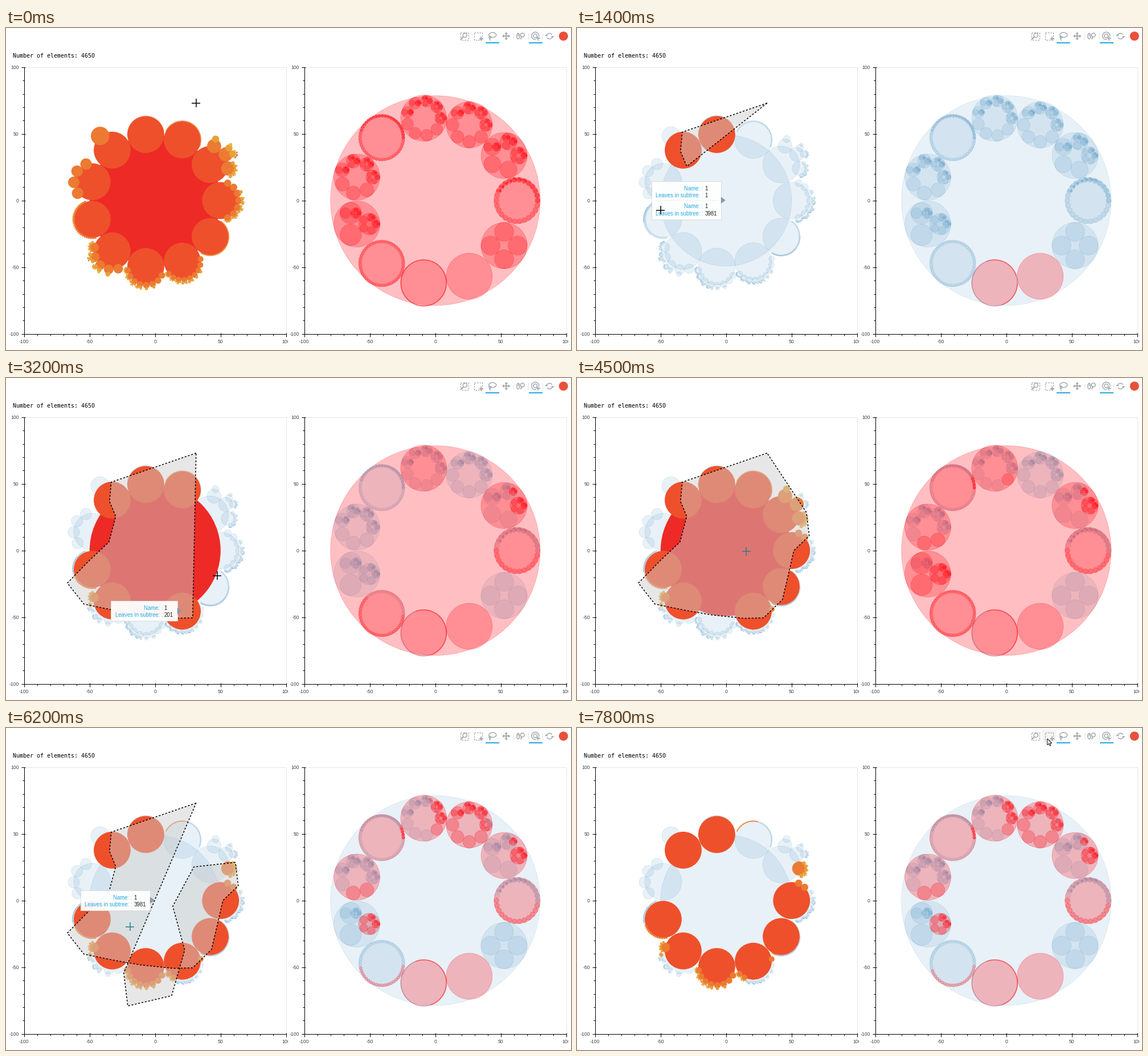
Recreate the animation shown at these times as a matplotlib script. Size 992 by 565 pixels, loop 8000 ms.

```python
import math

import matplotlib.pyplot as plt
import numpy as np
from matplotlib.animation import FuncAnimation
from matplotlib.collections import PathCollection
from matplotlib.patches import Arc, Circle, Ellipse, Polygon, Rectangle
from matplotlib.path import Path

WIDTH, HEIGHT, STEP, FRAMES = 992, 565, 100, 80
PX = 0.72  # points per pixel at 100 dpi
STRETCH = 2.34 / 2.3  # vertical against horizontal axis scale
SANS, MONO = "Liberation Sans", "DejaVu Sans Mono"
GREY, SKY, BLUE, RED = "#a1a6a9", "#26aae1", "#1f77b4", "#ff000c"
LEVELS = ["#ed2a26", "#ee502b", "#ec7a32", "#e8a037", "#e5b93f", "#dd2a24"]

fig = plt.figure(figsize=(WIDTH / 100, HEIGHT / 100), dpi=100, facecolor="white")
ax = fig.add_axes([0, 0, 1, 1])
ax.set_xlim(0.25, WIDTH + 0.25)
ax.set_ylim(HEIGHT + 0.25, 0.25)
ax.axis("off")


def line(xs, ys, color=GREY, width=1.3, **kw):
    return ax.plot(xs, ys, color=color, lw=width * PX, solid_capstyle="butt", **kw)[0]


def label(x, y, text, size, color="#444444", font=SANS, **kw):
    kw = {"ha": "left", "va": "center_baseline", **kw}
    return ax.text(x, y, text, fontsize=size * PX, color=color, family=font, **kw)


def shape(patch):
    return ax.add_patch(patch)


# ---- tree of circles -------------------------------------------------------

FAMILIES = [26, 5, 8, 9, 45, 7, 3, 45, 200, 1, 4]  # children of each branch
LEAFY = 7  # branches from here on have no grandchildren


def child_count(path, siblings, packed_r):
    """Earlier siblings have more children; small circles have none."""
    depth = len(path)
    if depth == 0:
        return len(FAMILIES)
    if depth == 1:
        return FAMILIES[path[0]]
    if path[0] >= LEAFY or packed_r < 2:
        return 0
    seniority = 1 - path[-1] / siblings
    return max(0, math.ceil((7 - depth) * seniority ** 2 - 0.5))


def polar(center, radius, angle):
    return (center[0] + radius * math.cos(angle),
            center[1] - radius * math.sin(angle) * STRETCH)


nodes = []  # (depth, outer centre, outer radius, packed centre, packed radius)


def grow(path, siblings, outer, outer_r, heading, packed, packed_r):
    nodes.append((len(path), outer, outer_r, packed, packed_r))
    n = child_count(path, siblings, packed_r)
    for i in range(n):
        s = math.sin(math.pi / n)
        if path:
            angle = heading - math.pi / 2 + math.pi * (i + 1) / (n + 1)
            small = outer_r * min(0.5, math.sin(math.pi / 2 / (n + 1)))
        else:
            angle, small = 2 * math.pi * (i - 5) / n, outer_r * s
        inner = packed_r * s / (1 + s)
        grow(path + (i,), n, polar(outer, outer_r, angle), small, angle,
             polar(packed, packed_r - inner, 2 * math.pi * i / n), inner)


grow((), 1, (262, 303), 115, 0, (754, 303), 184)
nodes.sort(key=lambda node: node[0])
centers = np.array([node[1] for node in nodes])
outer_paths = [Path.circle(node[1], node[2]) for node in nodes]
packed_paths = [Path.circle(node[3], node[4]) for node in nodes]
level_colors = np.array([LEVELS[min(node[0], 5)] for node in nodes])


def circles(zorder, face, face_alpha, edge_alpha, width=0.8):
    group = PathCollection([], linewidths=width * PX, zorder=zorder,
                           facecolors=[(face, face_alpha)], edgecolors=[(face, edge_alpha)])
    group.set_transform(ax.transData)
    ax.add_collection(group, autolim=False)
    return group


outer_muted = circles(2, BLUE, 0.1, 0.14)
outer_chosen = circles(3, RED, 1, 0, 0)
packed_muted = circles(2, BLUE, 0.1, 0.14)
packed_chosen = circles(3, RED, 0.25, 0.27)


def show_selection(mask):
    on, off = np.flatnonzero(mask), np.flatnonzero(~mask)
    outer_muted.set_paths([outer_paths[i] for i in off])
    packed_muted.set_paths([packed_paths[i] for i in off])
    outer_chosen.set_paths([outer_paths[i] for i in on])
    outer_chosen.set_facecolor(list(level_colors[on]))
    packed_chosen.set_paths([packed_paths[i] for i in on])


# ---- plot frames -----------------------------------------------------------

def plot_frame(left):
    right, top, bottom = left + 460, 69, 537
    line([left, right, right], [top, top, bottom], "#e5e5e5", 1, zorder=1)
    line([left, left], [top, bottom], "black", 1, zorder=4)
    line([left, right], [bottom, bottom], "black", 1, zorder=4)
    clip = Rectangle((0, 0), right + 3.5, HEIGHT, transform=ax.transData)
    for k in range(21):
        x, y = left + 23 * k, bottom - 23.4 * k
        major = k % 5 == 0
        out, inside = (5, 2) if major else (3, 0)
        line([x, x], [bottom - inside, bottom + out], "black", 1, zorder=4)
        line([left - out, left + inside], [y, y], "black", 1, zorder=4)
        if major:
            text = str(10 * k - 100)
            label(x, 549.5, text, 8.7, ha="center", clip_on=True).set_clip_path(clip)
            label(left - 9, y, text, 8.7, ha="right")


plot_frame(32)
plot_frame(524)
label(12, 48.5, "Number of elements: 4650", 10.05, "black", MONO)

# ---- toolbar ---------------------------------------------------------------

hover_tile = shape(Rectangle((817, 3), 24, 23, fc="#f4f4f4", ec="none", zorder=0))


def outline(patch_type, *args, **kw):
    shape(patch_type(*args, fill=False, ec=GREY, lw=1.4 * PX, **kw))


def plus(x, y, arm, width):
    line([x - arm, x + arm], [y, y], width=width)
    line([x, x], [y - arm, y + arm], width=width)


def arrowhead(x, y, dx, dy):
    shape(Polygon([(x, y), (x - 3 * dx + 3 * dy, y - 3 * dy + 3 * dx),
                   (x - 3 * dx - 3 * dy, y - 3 * dy - 3 * dx)], fc=GREY, ec="none"))


for x in (798, 822):
    line([x, x + 14, x + 14, x, x], [8, 8, 21, 21, 8], ls=(0, (2, 1.5)))
outline(Circle, (806, 13), 3.6)
line([803, 799], [16, 20], width=2.2)
plus(834.5, 19, 3.5, 1.8)
outline(Ellipse, (854.5, 12.5), 13, 8.5)
outline(Circle, (850, 16.5), 1.8)
line([850, 849, 851], [18, 20, 22])
plus(878.5, 14.5, 6, 1.8)
for dx, dy in ((1, 0), (-1, 0), (0, 1), (0, -1)):
    arrowhead(878.5 + 7 * dx, 14.5 + 7 * dy, dx, dy)
outline(Ellipse, (899.5, 14.5), 5, 10)
line([899.5, 899.5], [10, 14])
outline(Circle, (907, 12.5), 3.4)
line([905.5, 904], [15.5, 20], width=1.8)
outline(Arc, (929.5, 14), 13, 13, theta1=80, theta2=370)
outline(Circle, (929.5, 14), 3.3)
plus(934.5, 18.5, 3.5, 1.6)
for start in (10, 190):
    outline(Arc, (954.5, 14.5), 10, 10, theta1=start, theta2=start + 140)
arrowhead(960, 17.5, 0, 1)
arrowhead(949, 11.5, 0, -1)
for x in (891.5, 917, 942.5):
    line([x, x], [9, 20], "#e3e3e3", 1)
for x in (842, 918):
    shape(Rectangle((x, 24.8), 24, 2, fc=SKY, ec="none"))
shape(Circle((979, 14.5), 8, fc="#e8503a", ec="none"))

# ---- lasso, tooltips, pointer ----------------------------------------------

TRAIL = np.array([
    (334, 132), (185, 183), (182, 217), (193, 243), (181, 288), (147, 320), (108, 360),
    (137, 397), (191, 408), (237, 416), (294, 422), (328, 421), (361, 389), (371, 347),
    (381, 303), (408, 277), (403, 236), (330, 244), (293, 313), (314, 390), (291, 470),
    (214, 488), (207, 430), (214, 379), (220, 350), (212, 346)])
LAG = 2  # lasso corners behind the pointer
RELEASE = 6700
EXIT = np.array([(331, 284), (857, 62), (822, 52), (826, 19)])


def along(points, place):
    steps = np.arange(len(points))
    return [np.interp(place, steps, points[:, axis]) for axis in (0, 1)]


def trail_place(t):
    return np.interp(t, [100, 900, 1400, 3200, 6400], [0, 4, 5, 13, len(TRAIL) - 1])


lasso = shape(Polygon([(0, 0), (1, 1)], fc=("#cccccc", 0.47), ec="none", zorder=5))
lasso_edge = line([], [], "black", 1.5, ls=(0, (2.1, 1.9)), zorder=5, dash_capstyle="butt")


def tooltip(x, y, values):
    """Box left of the anchor with one pair of rows per value; returns its artists."""
    widest = max(len(v) for v in values)
    w, h = 100 + 5.5 * widest, 35 + 31.5 * (len(values) - 1)
    left, top = x - 9 - w, y - h / 2
    parts = [
        shape(Rectangle((left, top), w, h, fc=("white", 0.95), ec="#dddddd", lw=PX, zorder=6)),
        shape(Polygon([(x - 9, y - 6), (x - 9, y + 6), (x - 1, y)], fc="#8f97a5", ec="none", zorder=6)),
    ]
    for k, value in enumerate(values):
        base = top + 31.3 * k
        if k:
            parts.append(line([left + 6, left + w - 6], [base + 2, base + 2], "#e5e5e5", 1,
                              ls=(0, (2, 2)), zorder=7))
        for dy, name, text in ((12, "Name: :", "1"), (24.2, "Leaves in subtree: :", value)):
            parts.append(label(left + 91, base + dy, name, 9.7, SKY, ha="right", zorder=7))
            parts.append(label(left + 93.5, base + dy, text, 9.7, "#222222", zorder=7))
    return parts


TOOLTIPS = [
    (tooltip(262, 302.5, ["1", "3981"]), [(1200, 1600)]),
    (tooltip(310, 409, ["201"]), [(2900, 3400)]),
    (tooltip(262, 302.5, ["3981"]), [(4700, 5300), (5900, 6200), (6700, 7000)]),
]

cross = [line([], [], "black", 1.5, zorder=8) for _ in range(2)]
ARROW = np.array([(0, 0), (0, 11), (2.6, 8.6), (4.4, 12.5), (6.2, 11.7), (4.5, 8), (8, 8)])
arrow = shape(Polygon(ARROW, fc="white", ec="black", lw=0.9 * PX, zorder=8))


def pointer_at(t):
    if t < RELEASE:
        return along(TRAIL, trail_place(t))
    return along(np.vstack([TRAIL[-1:], EXIT]), np.interp(t, [6600, 6900, 7400, 7500, 7800], range(5)))


def draw_pointer(t):
    x, y = pointer_at(t)
    in_plot = y > 69
    over_root = math.hypot(x - 262, y - 303) < 113 and 1600 < t < RELEASE
    cross[0].set_data([x - 7.5, x + 7.5], [y, y])
    cross[1].set_data([x, x], [y - 7.5, y + 7.5])
    for arm in cross:
        arm.set_color("#1f818d" if over_root else "black")
        arm.set_visible(in_plot)
    arrow.set_xy(ARROW + (x, y))
    arrow.set_visible(not in_plot)
    hover_tile.set_visible(817 <= x <= 841 and y < 26)


def update(frame):
    t = frame * STEP
    last = max(0, round(trail_place(t)) - LAG)
    corners = TRAIL[:last + 1]
    closed = np.vstack([corners, corners[:1]])
    mask = np.zeros(len(nodes), bool)
    if last >= 2:
        mask = Path(closed).contains_points(centers)
    show_selection(mask if mask.any() else ~mask)

    lasso.set_xy(closed)
    lasso_edge.set_data(closed[:, 0], closed[:, 1])
    for part in (lasso, lasso_edge):
        part.set_visible(last >= 1 and t < RELEASE)
    for parts, spans in TOOLTIPS:
        shown = any(start <= t <= end for start, end in spans)
        for part in parts:
            part.set_visible(shown)
    draw_pointer(t)
    return []


animation = FuncAnimation(fig, update, frames=FRAMES, interval=STEP, repeat=True,
                          repeat_delay=0, init_func=lambda: update(0))
plt.show()
```
